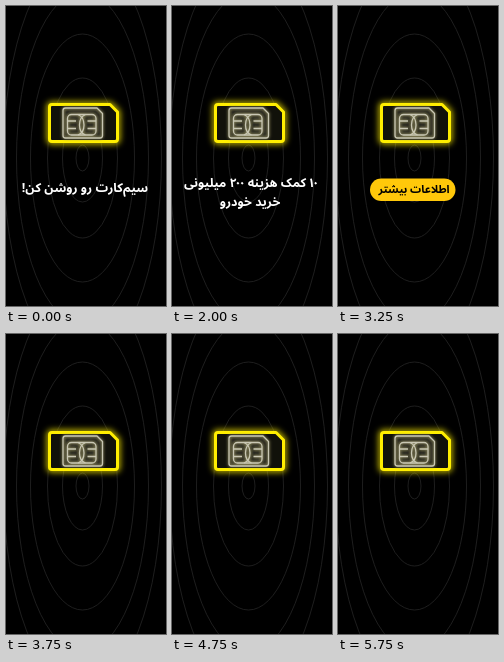
An HTML page that plays this animation: 160x300 px, repeating every 6250 ms.

```html
<!DOCTYPE html>
<html lang="fa">
<head>
<meta charset="utf-8">
<style>
html, body { margin: 0; width: 100%; height: 100%; overflow: hidden; background: #000; }
svg { display: block; width: 160px; height: 300px; }
text { font-family: "Noto Sans Arabic", "DejaVu Sans", sans-serif; text-anchor: middle; direction: rtl; fill: #fff; }
.bold { font-weight: 700; }
.intro, .offer, .button { animation: 6250ms step-end infinite; }
.intro { animation-name: intro; }
.offer { animation-name: offer; }
.button { animation-name: blink; }
@keyframes intro { 0% { opacity: 1; } 24%, 100% { opacity: 0; } }
@keyframes offer {
  0% { opacity: 0; transform: translateX(15px); }
  24% { opacity: 1; transform: translateX(15px); }
  28% { opacity: 1; transform: translateX(2px); }
  32% { opacity: 1; transform: none; }
  52%, 100% { opacity: 0; transform: none; }
}
@keyframes blink {
  0%, 60%, 76%, 92%, 100% { opacity: 0; }
  52%, 68%, 84% { opacity: 1; }
}
</style>
</head>
<body>
<svg viewBox="0 0 160 300">
  <defs>
    <filter id="glow" x="-30%" y="-50%" width="160%" height="200%"><feGaussianBlur stdDeviation="3"/></filter>
    <filter id="soft" x="-30%" y="-30%" width="160%" height="160%"><feGaussianBlur stdDeviation="1.5"/></filter>
    <path id="card" d="M46 98.5H104L111.5 106V133Q111.5 135.5 109 135.5H46Q43.5 135.5 43.5 133V101Q43.5 98.5 46 98.5Z"/>
    <g id="sim">
      <path d="M59.5 102H91L96.5 107.5V129.5Q96.5 132 94 132H59.5Q57 132 57 129.5V104.5Q57 102 59.5 102Z"/>
      <rect x="61.5" y="108.5" width="28.5" height="20.5" rx="4"/>
      <path d="M61.5 115H70M61.5 122.5H70M81.5 115H90M81.5 122.5H90M72 108.5Q78 111 78 119T72 129M79.5 108.5Q73.5 111 73.5 119T79.5 129"/>
    </g>
  </defs>
  <g id="rings" fill="none" stroke="#262626" stroke-width="0.8"></g>
  <g fill="none" stroke-linejoin="round">
    <use href="#card" stroke="#e6d800" stroke-width="5" filter="url(#glow)"/>
    <use href="#card" fill="#11110a" stroke="#ffee00" stroke-width="3"/>
    <use href="#sim" fill="#24231a" stroke="#88845a" stroke-width="2" filter="url(#soft)"/>
    <use href="#sim" stroke="#c9c7b4" stroke-width="1.3"/>
  </g>
  <text class="intro bold" x="79" y="186" font-size="12.5">سیم&zwnj;کارت رو روشن کن!</text>
  <g class="offer" font-size="12.5" font-weight="600">
    <text x="79" y="181">۱۰ کمک هزینه ۲۰۰ میلیونی</text>
    <text x="78" y="200">خرید خودرو</text>
  </g>
  <g class="button">
    <rect x="32" y="172.5" width="85.5" height="22.5" rx="11.25" fill="#ffc80a"/>
    <text class="bold" x="76" y="187" font-size="11" style="fill:#000">اطلاعات بیشتر</text>
  </g>
</svg>
<script>
const rings = document.getElementById("rings");
for (const [rx, ry] of [[6.5, 13], [20, 44], [35, 80], [52, 124], [66, 166], [79, 205]]) {
  const ring = document.createElementNS("http://www.w3.org/2000/svg", "ellipse");
  const size = { cx: 76.5, cy: 152, rx, ry };
  for (const key in size) ring.setAttribute(key, size[key]);
  rings.append(ring);
}
</script>
</body>
</html>
```
